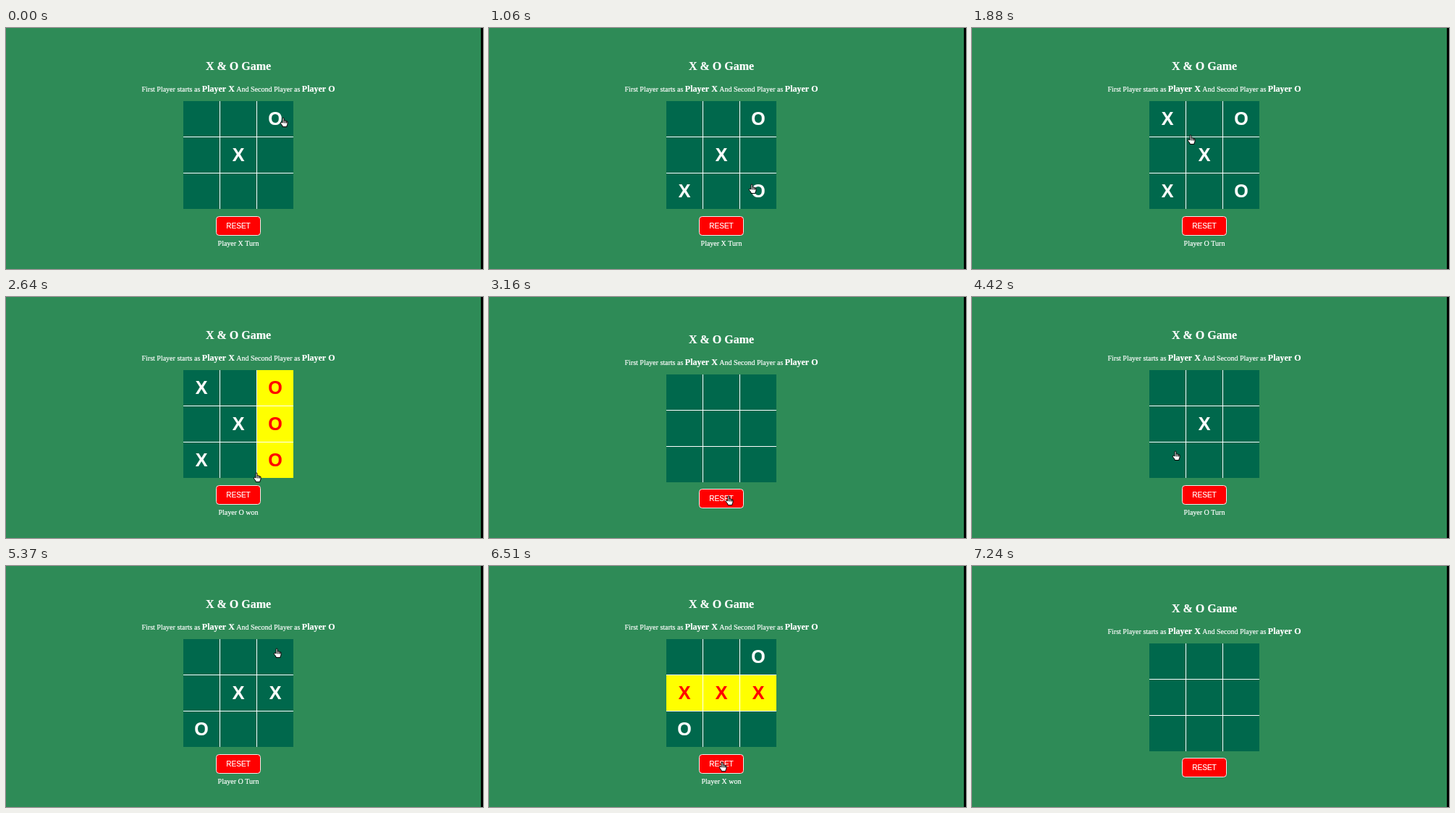
Animation, 659 px wide and 333 px high, one loop 7.34 s. Source, as an HTML page with a canvas:

```html
<!DOCTYPE html>
<html lang="en">
<head>
<meta charset="utf-8">
<title>X &amp; O Game</title>
<style>
  html, body { margin: 0; width: 100%; height: 100%; overflow: hidden; background: #2e8b57; }
  canvas { display: block; }
</style>
</head>
<body>
<canvas id="stage" width="659" height="333"></canvas>
<script>
const ctx = document.getElementById('stage').getContext('2d');
const LOOP = 7340, STEP = LOOP / 67;   // the screen refreshes once per step
const GLIDE = 500, DWELL = 150;        // pointer travel, then rest before a click
const SERIF = '"Liberation Serif", "Times New Roman", serif';
const SANS = '"Liberation Sans", Arial, sans-serif';
const MID = 321, LEFT = 245, TOP = 101, PITCH_X = 51, PITCH_Y = 50, RESET_Y = 260;

// Clicks: [time, x, y]; the last one only leads the pointer off the stage
const clicks = [
  [0, 382, 124], [0, 382, 124], [560, 272, 222], [940, 364, 218],
  [1570, 272, 128], [2330, 368, 195], [2995, 330, 275], [4130, 313, 174],
  [4630, 272, 222], [5100, 370, 174], [5550, 373, 112], [6000, 272, 174],
  [6620, 321, 271], [LOOP, 480, 345]
];
const opening = 4;

function cellAt(x, y) {
  return Math.floor((y - TOP) / PITCH_Y) * 3 + Math.floor((x - LEFT) / PITCH_X);
}

function findLine(cells, mark) {
  const owned = i => cells[i] === mark;
  const runs = [[0, 4, 8], [2, 4, 6]];
  for (let i = 0; i < 3; i++) runs.push([3 * i, 3 * i + 1, 3 * i + 2], [i, i + 3, i + 6]);
  return runs.find(run => run.every(owned));
}

function gameAt(t) {
  const fresh = () => ({ cells: [], turn: 'X', status: '', win: [] });
  let game = fresh();
  clicks.forEach(([when, x, y], n) => {
    if (when > t) return;
    if (y >= RESET_Y) {
      game = fresh();
      return;
    }
    const { cells, turn } = game;
    cells[n ? cellAt(x, y) : opening] = turn;
    const line = findLine(cells, turn);
    if (line) {
      game.win = line;
      game.status = `Player ${turn} won`;
    } else {
      game.turn = turn === 'X' ? 'O' : 'X';
      game.status = `Player ${game.turn} Turn`;
    }
  });
  return game;
}

function pointerAt(t) {
  const i = clicks.findIndex(c => c[0] > t);
  const [t0, x0, y0] = clicks[i - 1], [t1, x1, y1] = clicks[i];
  const end = t1 - DWELL, start = Math.max(t0, end - GLIDE);
  const u = Math.min(1, Math.max(0, (t - start) / (end - start)));
  const k = u * u * (3 - 2 * u);
  return [Math.round(x0 + (x1 - x0) * k), Math.round(y0 + (y1 - y0) * k)];
}

function rect(x, y, w, h, color) {
  ctx.fillStyle = color;
  ctx.fillRect(x, y, w, h);
}

function text(str, x, y, font, color = '#fff', align = 'center') {
  ctx.font = font;
  ctx.textAlign = align;
  ctx.fillStyle = ctx.strokeStyle = color;
  ctx.lineWidth = 0.2;
  ctx.fillText(str, x, y);
  ctx.strokeText(str, x, y);
  return ctx.measureText(str).width;
}

function drawIntro(y) {
  const plain = `10px ${SERIF}`, bold = `bold 12px ${SERIF}`;
  let x = 187.5;
  for (const [str, font] of [
    ['First Player starts as ', plain], ['Player X', bold],
    [' And Second Player as ', plain], ['Player O', bold]
  ]) x += text(str, x, y, font, '#fff', 'left');
}

function drawBoard(top, { cells, win }) {
  rect(LEFT, top, 152, 149, '#fff');
  for (let i = 0; i < 9; i++) {
    const x = LEFT + i % 3 * PITCH_X, y = top + Math.floor(i / 3) * PITCH_Y;
    const won = win.includes(i);
    rect(x, y, PITCH_X - 1, PITCH_Y - 1, won ? '#ff0' : '#00684c');
    if (cells[i]) text(cells[i], x + 25, y + 33, `bold 25px ${SANS}`, won ? '#f00' : '#fff');
  }
}

function drawButton(y) {
  ctx.beginPath();
  ctx.roundRect(290.5, y + 0.5, 61, 26, 4);
  ctx.fillStyle = '#f00';
  ctx.fill();
  ctx.strokeStyle = '#fff';
  ctx.lineWidth = 0.9;
  ctx.stroke();
  text('RESET', MID, y + 17, `10px ${SANS}`);
}

const hand = new Path2D('M0 7V1Q0 0 1 0Q2 0 2 1V4Q3 3 4 4.3Q5 3.6 5.7 5Q7 4.5 7 6V9L6 11V12.5H0V11.2L-2.6 7.8Q-3 6 -1.6 6.2Z');
const knuckles = new Path2D('M2 4V7.5M4 4.5V7.5M5.7 5V7.5');
const arrow = new Path2D('M0 0V11L2.6 8.6L4.3 12.4L6 11.6L4.4 8H8Z');

function drawPointer([x, y], top, buttonTop) {
  const inside = (l, t, w, h) => x >= l && x < l + w && y >= t && y < t + h;
  const link = inside(LEFT, top, 152, 149) || inside(290, buttonTop, 62, 27);
  ctx.save();
  ctx.translate(x, y);
  ctx.fillStyle = '#fff';
  ctx.strokeStyle = '#000';
  ctx.lineWidth = 1;
  ctx.fill(link ? hand : arrow);
  ctx.stroke(link ? hand : arrow);
  if (link) ctx.stroke(knuckles);
  ctx.restore();
}

function draw(t) {
  const game = gameAt(t);
  // Without a status line the centred page sits lower
  const drop = game.status ? 0 : 6;
  const top = TOP + drop, buttonTop = RESET_Y + (game.status ? 0 : 5);
  rect(0, 0, 659, 333, '#2e8b57');
  text('X & O Game', MID, 58 + drop, `bold 16px ${SERIF}`);
  drawIntro(88 + drop);
  drawBoard(top, game);
  drawButton(buttonTop);
  text(game.status, MID, 301, `10px ${SERIF}`);
  drawPointer(pointerAt(t), top, buttonTop);
  rect(656, 0, 3, 333, '#000');
}

function tick() {
  const now = performance.now() % LOOP;
  draw(Math.floor(now / STEP) * STEP);
  requestAnimationFrame(tick);
}
tick();
</script>
</body>
</html>
```
